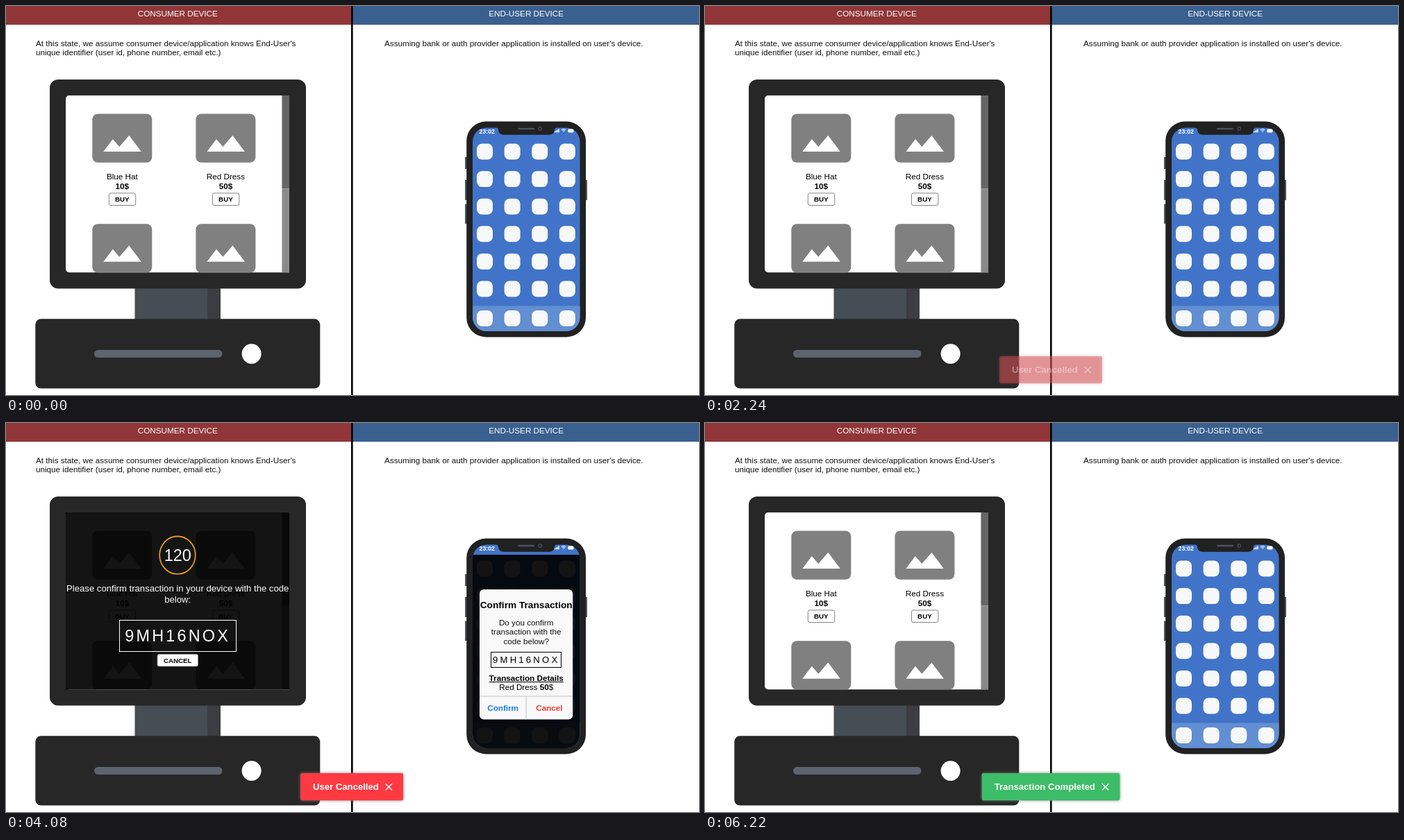
Write an HTML page with a canvas that moves like this. It is 998 px wide and 561 px high and loops after 7.79 s.

```html
<!DOCTYPE html>
<html lang="en">
<head>
<meta charset="utf-8">
<title>Transaction confirmation flow</title>
<style>
html, body { margin: 0; width: 100%; height: 100%; overflow: hidden; background: #fff; }
canvas { display: block; width: 998px; height: 561px; }
</style>
</head>
<body>
<canvas id="stage" width="998" height="561"></canvas>
<script>
const ctx = document.getElementById('stage').getContext('2d');
const LOOP = 7790;
const FONT = '"Liberation Sans", Arial, sans-serif';
const BODY = 11.7, LARGE = 13.14, HUGE = 23.4, SMALL = 9.74;
const DIM = 'rgba(0,0,0,.92)';

const orders = [
  { code: '71FYS37X', item: 'Blue Hat', price: '10' },
  { code: '9MH16NOX', item: 'Red Dress', price: '50' }
];

function rect(x, y, w, h, color) {
  ctx.fillStyle = color;
  ctx.fillRect(x, y, w, h);
}

function round(x, y, w, h, r, fill, line, width = 1) {
  ctx.beginPath();
  ctx.roundRect(x, y, w, h, r);
  if (fill) { ctx.fillStyle = fill; ctx.fill(); }
  if (line) { ctx.strokeStyle = line; ctx.lineWidth = width; ctx.stroke(); }
}

function ellipse(x, y, rx, ry, fill, line, width) {
  ctx.beginPath();
  ctx.ellipse(x, y, rx, ry, 0, 0, Math.PI * 2);
  if (fill) { ctx.fillStyle = fill; ctx.fill(); }
  if (line) { ctx.strokeStyle = line; ctx.lineWidth = width; ctx.stroke(); }
}

function path(points, fill, line, width) {
  ctx.beginPath();
  points.forEach(([x, y], i) => i ? ctx.lineTo(x, y) : ctx.moveTo(x, y));
  if (fill) { ctx.fillStyle = fill; ctx.fill(); }
  if (line) { ctx.strokeStyle = line; ctx.lineWidth = width; ctx.stroke(); }
}

function text(str, x, y, { size = BODY, bold = false, color = '#000', align = 'center' } = {}) {
  ctx.font = `${bold ? 'bold ' : ''}${size}px ${FONT}`;
  ctx.textAlign = align;
  ctx.fillStyle = color;
  ctx.fillText(str, x, y);
  return ctx.measureText(str).width;
}

// Inner shadow of a pressed button
function pressedShade(x, y, w, h, r) {
  ctx.save();
  ctx.beginPath();
  ctx.roundRect(x, y, w, h, r);
  ctx.clip();
  ctx.shadowColor = 'rgba(0,0,0,.75)';
  ctx.shadowBlur = 5;
  round(x - 1, y - 1, w + 2, h + 2, r, null, '#777', 2);
  ctx.restore();
}

// Letter-spaced code inside a thin box
function codeBox(code, cx, top, height, base, size, gap, pad, color) {
  ctx.save();
  ctx.font = `${size}px ${FONT}`;
  ctx.letterSpacing = '0px';
  const w = ctx.measureText(code).width + gap * code.length + pad * 2;
  const left = cx - w / 2;
  ctx.strokeStyle = color;
  ctx.lineWidth = 1;
  ctx.strokeRect(Math.round(left) + .5, top, Math.round(w) - 1, height);
  ctx.letterSpacing = gap + 'px';
  text(code, left + pad, base, { size, color, align: 'left' });
  ctx.restore();
}

function drawPage() {
  rect(0, 0, 998, 561, '#fff');
  rect(0, 0, 497, 27, '#903638');
  rect(499, 0, 499, 27, '#3a608f');
  rect(497, 0, 2.6, 561, '#000');
  text('CONSUMER DEVICE', 247.3, 15, { color: '#fff' });
  text('END-USER DEVICE', 749.2, 15, { color: '#fff' });
  const left = { align: 'left', color: '#111' };
  text("At this state, we assume consumer device/application knows End-User's", 43, 57.6, left);
  text('unique identifier (user id, phone number, email etc.)', 43, 70.8, left);
  text("Assuming bank or auth provider application is installed on user's device.", 545, 57.6, left);
}

function drawTile(x, y) {
  round(x, y, 86, 70.3, 8, '#808080');
  const peaks = [[16, 54.5], [29.5, 36.5], [39, 47.5], [53, 31.3], [70.5, 54.5]];
  path(peaks.map(([px, py]) => [x + px, y + py]), '#fff');
}

function drawProduct(index, x, pressed) {
  const { item, price } = orders[index];
  const cx = x + 43;
  drawTile(x, 155.5);
  drawTile(x, 314.2);
  text(item, cx, 250.4);
  text(price + '$', cx, 263.7, { bold: true });
  round(cx - 19, 269.9, 38.4, 17.6, 2.5, '#fff', '#777', .9);
  if (pressed) pressedShade(cx - 19, 270, 38, 17.5, 2.5);
  text('BUY', cx, 282.2, { size: SMALL, bold: true });
}

function drawRegister(pressed) {
  rect(185.5, 405, 105, 48, '#464d55');
  rect(290, 405, 19, 48, '#3b3d42');
  round(63, 106, 369, 301.5, 12, '#272727');
  round(42.3, 451.3, 410, 100.2, 8, '#272727');
  round(127, 496, 184.5, 11, 5.5, '#5c6470');
  ellipse(353.6, 501.6, 14, 14.4, '#fff');

  round(86, 129, 322, 255.3, [5, 0, 0, 5], '#fff');
  rect(397.4, 129, 10.6, 134.3, '#666');
  rect(397.4, 263.3, 10.6, 121, '#8a8a8a');
  drawProduct(0, 124.3, pressed === 0);
  drawProduct(1, 273.4, pressed === 1);
}

function drawCountdown(order, seconds) {
  const cx = 247.2, white = { color: '#fff', size: LARGE };
  rect(86, 129, 322, 255.3, DIM);
  ellipse(cx - .2, 190.6, 25.8, 27.2, null, '#f5a51f', 1.6);
  text(seconds, cx, 198.8, { size: HUGE, color: '#fff' });
  text('Please confirm transaction in your device with the code', cx, 243.4, white);
  text('below:', cx, 258.5, white);
  codeBox(order.code, cx, 284.5, 45, 315.2, HUGE, 3.2, 8.6, '#fff');
  round(218, 333.4, 58.6, 17.5, 2.5, '#fff', '#888', .8);
  text('CANCEL', cx, 345.6, { size: SMALL, bold: true });
}

function drawIcons() {
  for (let row = 0; row < 7; row++) {
    const y = row < 6 ? 198.5 + row * 39.6 : 439;
    for (let col = 0; col < 4; col++) {
      round(678 + col * 39.6, y, 23, 23, 7.5, '#f7f8fa');
    }
  }
}

function drawStatus() {
  text('23:02', 681.5, 183.6, { size: 8.8, bold: true, color: '#fff', align: 'left' });
  for (let i = 0; i < 4; i++) {
    const h = 1.6 + i * 1.1;
    rect(790 + i * 1.8, 182.3 - h, 1.3, h, '#fff');
  }
  ctx.strokeStyle = '#fff';
  ctx.lineWidth = 1;
  for (const r of [1, 2.8, 4.6]) {
    ctx.beginPath();
    ctx.arc(803, 182, r, Math.PI * 1.25, Math.PI * 1.75);
    ctx.stroke();
  }
  round(809.3, 177.5, 8.2, 5, 1.5, '#fff');
}

function drawNotch() {
  ctx.fillStyle = '#212121';
  ctx.beginPath();
  ctx.moveTo(705, 175);
  ctx.quadraticCurveTo(709, 175.5, 709, 178.5);
  ctx.quadraticCurveTo(709.5, 185.8, 717, 185.8);
  ctx.lineTo(782, 185.8);
  ctx.quadraticCurveTo(789.5, 185.8, 790, 178.5);
  ctx.quadraticCurveTo(790, 175.5, 794, 175);
  ctx.fill();
  round(737, 175.8, 24, 2.4, 1.2, '#4c535e');
  ellipse(769.2, 177, 2.2, 2.4, null, '#4c535e', 1.1);
}

function drawPhone(modal) {
  const side = '#4c545e';
  rect(661, 218, 4, 17, side);
  rect(661, 251, 4, 29, side);
  rect(661, 285.5, 4, 28.5, side);
  rect(833, 251, 4, 29, side);
  round(663.2, 166.5, 171.8, 311, 28, '#212121');

  ctx.save();
  ctx.beginPath();
  ctx.roundRect(672, 175.4, 154.5, 293.6, 20);
  ctx.clip();
  rect(672, 175, 155, 295, '#4174c8');
  rect(672, 432.5, 155, 37, '#628ed2');
  drawIcons();
  if (modal) rect(672, 190, 155, 280, DIM);
  ctx.restore();
  drawNotch();
  drawStatus();
  if (modal) drawModal(modal.order, modal.pressed);
}

function drawModal(order, pressed) {
  const cx = 749.2;
  round(682, 240, 134.2, 187.4, 6, '#f9f9f9');
  text('Confirm Transaction', cx, 267, { size: 13.68, bold: true });
  ['Do you confirm', 'transaction with the', 'code below?'].forEach((line, i) =>
    text(line, cx, 292.2 + i * 13.2, { color: '#111' }));
  codeBox(order.code, cx, 330.5, 22, 346, LARGE, 3.2, 2.7, '#000');

  const w = text('Transaction Details', cx, 371.8, { bold: true });
  rect(cx - w / 2, 373, w, 1, '#000');
  drawOrderLine(order, cx, 385);

  rect(682, 393.6, 134.2, .9, '#bbb');
  rect(748.6, 394, .9, 33.4, '#bbb');
  if (pressed === 'confirm') pressedShade(682.2, 394, 66.8, 33.4, [0, 0, 0, 6]);
  if (pressed === 'cancel') pressedShade(749, 394, 67, 33.4, [0, 0, 6, 0]);
  text('Confirm', 715.6, 414.9, { bold: true, color: '#147de8' });
  text('Cancel', 782.4, 414.9, { bold: true, color: '#f23a32' });
}

// Regular name, bold amount, regular currency sign
function drawOrderLine({ item, price }, cx, y) {
  const parts = [[item + ' ', false], [price, true], ['$', false]];
  const widths = parts.map(([str, bold]) => {
    ctx.font = `${bold ? 'bold ' : ''}${BODY}px ${FONT}`;
    return ctx.measureText(str).width;
  });
  let x = cx - widths.reduce((a, b) => a + b) / 2;
  parts.forEach(([str, bold], i) => {
    text(str, x, y, { bold, align: 'left' });
    x += widths[i];
  });
}

function drawToast(label, x, w, color, alpha) {
  ctx.save();
  ctx.globalAlpha = alpha;
  ctx.save();
  ctx.shadowColor = 'rgba(120,120,120,.9)';
  ctx.shadowBlur = 4;
  round(x, 505, w, 39.3, 2.5, color);
  ctx.restore();
  text(label, x + 18, 528.8, { size: LARGE, bold: true, color: '#fff', align: 'left' });
  const cx = x + w - 20.7, cy = 524.9, d = 4.7;
  path([[cx - d, cy - d], [cx + d, cy + d]], null, '#fff', 1.4);
  path([[cx + d, cy - d], [cx - d, cy + d]], null, '#fff', 1.4);
  ctx.restore();
}

function render(t) {
  const within = (from, to) => t >= from && t < to;
  const order = t < 3000 ? orders[0] : orders[1];

  let buy = -1;
  if (within(620, 700)) buy = 0;
  if (within(3840, 3930)) buy = 1;

  let button = null;
  if (within(1860, 1960)) button = 'cancel';
  if (within(5610, 5710)) button = 'confirm';

  const asking = within(780, 2010) || within(4030, 5790);
  const waiting = within(820, 2240) || within(4080, 6220);
  let seconds = 120;
  if (within(1800, 2240) || t >= 5070) seconds = 119;
  if (t >= 6050) seconds = 118;

  drawPage();
  drawRegister(buy);
  if (waiting) drawCountdown(order, seconds);
  drawPhone(asking && { order, pressed: button });

  if (within(2240, 4790)) {
    const alpha = t < 2300 ? .4 : t < 2360 ? .8 : 1;
    drawToast('User Cancelled', 424, 148, '#fd3a42', alpha);
  }
  if (t >= 6220) drawToast('Transaction Completed', 398.7, 198.6, '#3dbd67', 1);
}

const start = performance.now();
function tick() {
  render((performance.now() - start) % LOOP);
  requestAnimationFrame(tick);
}
tick();
</script>
</body>
</html>
```
